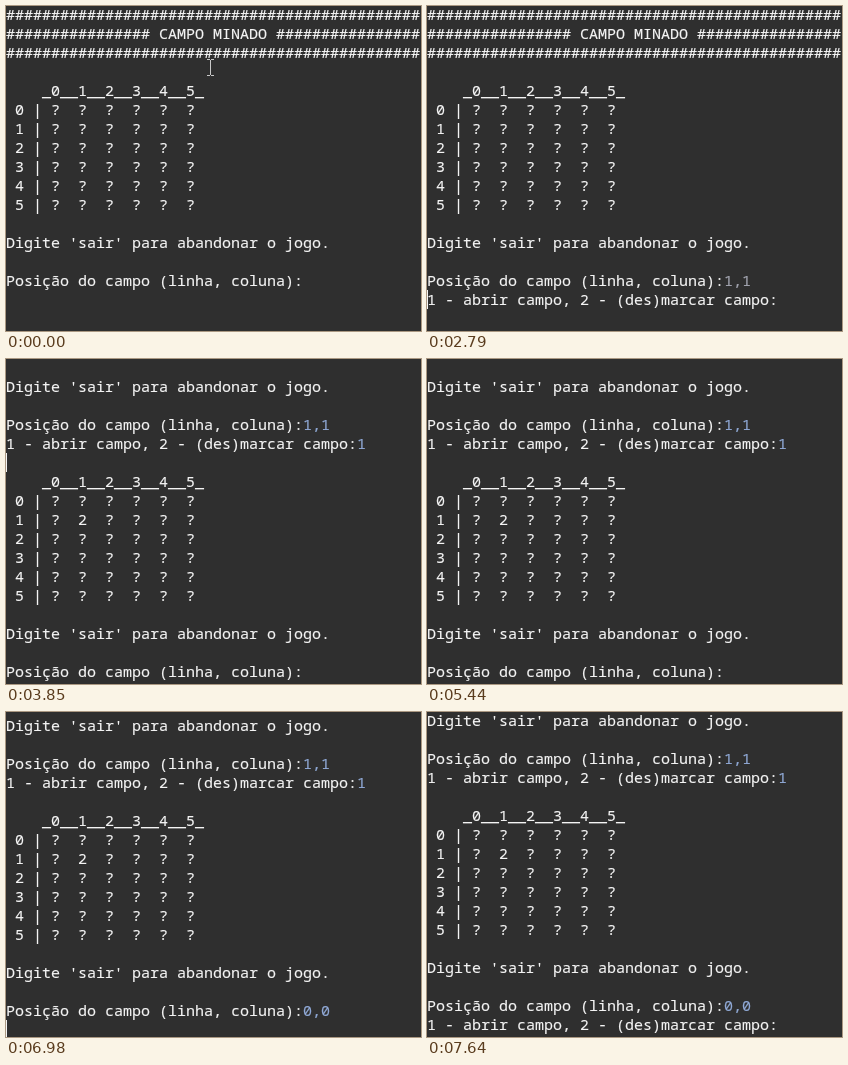
Write an HTML page that moves like this. It is 415 by 325 pixels and loops after 8000 ms.

```html
<!DOCTYPE html>
<html lang="pt">
<head>
<meta charset="utf-8">
<title>Campo minado</title>
<style>
  html, body { margin: 0; width: 100%; height: 100%; overflow: hidden; background: #2f2f2f; }
  #stage { position: absolute; left: 0; top: 0; width: 415px; height: 325px; overflow: hidden; }
  #doc { position: absolute; left: 0; top: -1px; }
  #log {
    margin: 0; color: #f4f4f4; -webkit-text-stroke: .15px;
    font: 15px/19px "Noto Sans Mono", "Liberation Mono", monospace;
    font-variant-ligatures: none;
  }
  #log i { font-style: normal; color: #a3a5b0; }
  #log i.old { color: #90a9d6; }
  #caret { position: absolute; width: 1px; height: 19px; background: #f4f4f4; }
  #mouse { position: absolute; left: 201px; top: 53px; }
</style>
</head>
<body>
<div id="stage">
  <div id="doc"><pre id="log"></pre><b id="caret"></b></div>
  <svg id="mouse" width="7" height="17" fill="none" stroke="#c8c8c8">
    <path d="M0 .5H3M4 .5H7M3.5 1V16M0 16.5H3M4 16.5H7"/>
  </svg>
</div>
<script>
const LOOP = 8000, ROW = 19, COL = 9, VIEW_ROWS = 17;
const KEY = 200, REPLY = 130, BLINK = 530;
const LAG = 5; // px the scroll falls short until the reply is printed

const [doc, log, caret, mouse] = ['doc', 'log', 'caret', 'mouse'].map(id => document.getElementById(id));

const askCell = 'Posição do campo (linha, coluna):';
const askMove = '1 - abrir campo, 2 - (des)marcar campo:';

function board(open = {}) {
  const n = [...Array(6).keys()];
  return [
    '',
    '    ' + n.map(c => `_${c}_`).join(''),
    ...n.map(r => ` ${r} | ` + n.map(c => open[[r, c]] || '?').join('  ')),
    '', "Digite 'sair' para abandonar o jogo.", '', askCell
  ];
}

const rule = '#'.repeat(46), side = '#'.repeat(16);
const intro = [rule, `${side} CAMPO MINADO ${side}`, rule, ...board()];

const turns = [
  { text: '1,1', start: 200, enter: 1600, reply: [askMove] },
  { text: '1', start: 3450, enter: 3720, reply: board({ '1,1': 2 }) },
  { text: '0,0', start: 6180, enter: 6980, reply: [askMove] }
];

// Replay the session up to time t.
function session(t) {
  const lines = [...intro];
  let row = 0, col = 0, moved = -BLINK, lag = 0;
  for (const { text, start, enter, reply } of turns) {
    if (t < start) break;
    const last = lines.length - 1;
    const count = Math.min(text.length, Math.floor((t - start) / KEY) + 1);
    const entered = t >= enter;
    row = last;
    col = lines[last].length + count;
    moved = start + (count - 1) * KEY;
    lines[last] += `<i${entered ? ' class="done"' : ''}>${text.slice(0, count)}</i>`;
    if (!entered) break;

    const replied = t >= enter + REPLY;
    row = last + 1;
    col = 0;
    moved = replied ? enter + REPLY : enter;
    lag = replied ? 0 : LAG;
    lines.push(...(replied ? reply : ['']));
  }
  const scroll = Math.max(0, (lines.length - VIEW_ROWS) * ROW - lag);
  const lit = Math.floor((t - moved) / BLINK) % 2 === 0;
  return { lines, row, col, scroll, lit };
}

let drawn = '';
function render(t) {
  const s = session(t);
  let html = s.lines.join('\n');
  // Entered text turns blue once the console has scrolled.
  if (s.scroll) html = html.replaceAll('"done"', '"old"');
  if (html !== drawn) log.innerHTML = drawn = html;
  doc.style.top = `${-1 - s.scroll}px`;
  caret.style.left = `${s.col * COL}px`;
  caret.style.top = `${s.row * ROW}px`;
  caret.style.opacity = s.lit ? 1 : 0;
  mouse.style.opacity = t < turns[0].start ? 1 : 0;
}

const begin = performance.now();
function tick() {
  render((performance.now() - begin) % LOOP);
  requestAnimationFrame(tick);
}
tick();
</script>
</body>
</html>
```
